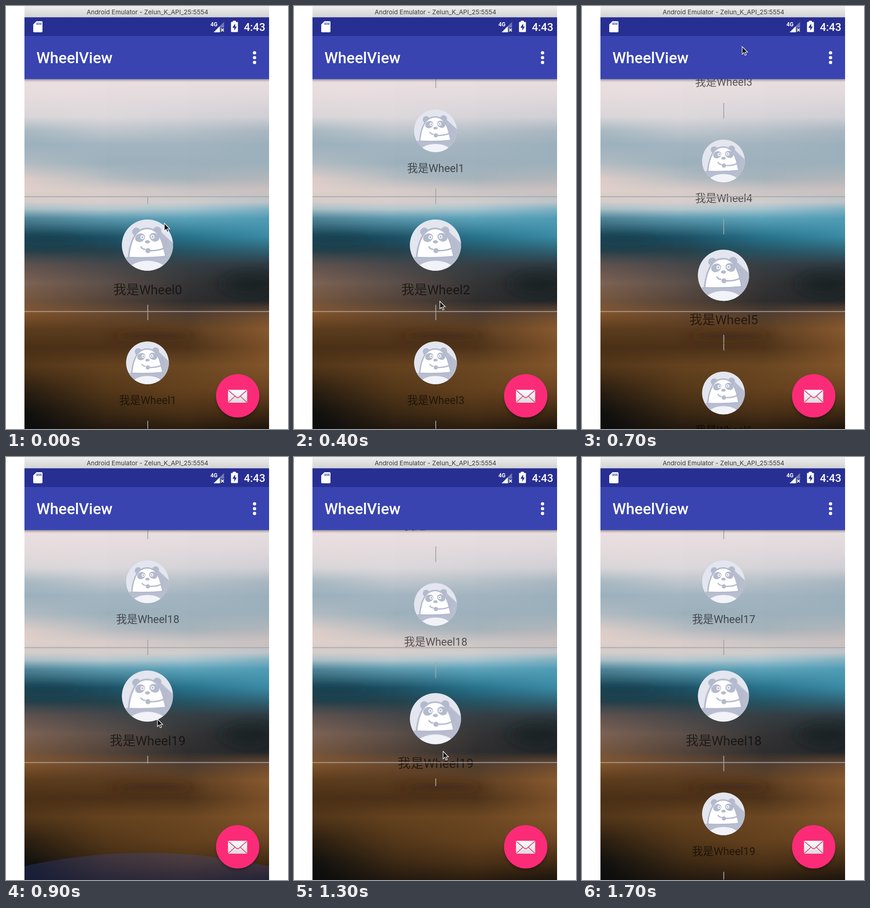
An HTML page that plays this animation: 611 by 917 pixels, repeating every 1.8 s.

```html
<!DOCTYPE html>
<html lang="en">
<head>
<meta charset="utf-8">
<title>WheelView</title>
<style>
  html, body { margin: 0; width: 100%; height: 100%; overflow: hidden; background: #fff; }
  svg { display: block; }
  text { font-family: Roboto, "Noto Sans CJK SC", "Noto Sans CJK", sans-serif; }
  .bar { font-family: Inter, sans-serif; font-size: 13.6px; fill: #3b3b3b; text-anchor: middle; }
  .label { text-anchor: middle; fill: #000; fill-opacity: .6; }
</style>
</head>
<body>
<svg width="611" height="917" viewBox="0 0 611 917">
  <defs>
    <linearGradient id="chrome" x2="0" y2="1">
      <stop stop-color="#efeeef"/><stop offset="1" stop-color="#d3d2d3"/>
    </linearGradient>
    <linearGradient id="drop" x2="0" y2="1">
      <stop stop-opacity=".32"/><stop offset="1" stop-opacity="0"/>
    </linearGradient>
    <linearGradient id="paper" x2="0" y2="1">
      <stop stop-color="#fff"/><stop offset="1" stop-color="#d9d9d9"/>
    </linearGradient>
    <filter id="soft" x="-50%" y="-80%" width="200%" height="260%"><feGaussianBlur stdDeviation="16 9"/></filter>
    <filter id="blur3" x="-20%" y="-20%" width="140%" height="140%"><feGaussianBlur stdDeviation="3"/></filter>
    <clipPath id="view"><rect x="40" y="158" width="530" height="759"/></clipPath>
    <clipPath id="disc"><circle r="55.5"/></clipPath>
    <g id="avatar" clip-path="url(#disc)">
      <circle r="56" fill="#e3e6ef"/>
      <path d="M28-30L62 2V60H-60L-44 26Z" fill="#b8bed0"/>
      <path d="M-60 27Q0 24 60 27V60H-60Z" fill="#b8bed0"/>
      <circle cx="-24" cy="-29" r="9" fill="#b4bacd"/>
      <circle cx="21" cy="-31" r="9" fill="#b4bacd"/>
      <path d="M-41 27C-39 6-32-35-2-36C26-37 34-6 40 25Q0 29-41 27Z" fill="#fff" stroke="#b4bacd" stroke-width="3.5"/>
      <ellipse cx="-16" cy="-16" rx="11" ry="9" transform="rotate(-25 -16 -16)" fill="#b4bacd"/>
      <ellipse cx="15" cy="-17" rx="11" ry="9" transform="rotate(25 15 -17)" fill="#b4bacd"/>
      <g fill="#b4bacd" stroke="#fff" stroke-width="2">
        <circle cx="-11" cy="-17" r="3.2"/><circle cx="11" cy="-18" r="3.2"/>
      </g>
      <ellipse cx="0" cy="-7" rx="5.5" ry="3.6" fill="#b4bacd"/>
      <path d="M-14 4Q-11 9-6 9M2 12Q27 13 38 5M33-14Q43-9 40 4Q38 9 34 8" fill="none" stroke="#b4bacd" stroke-width="3.2" stroke-linecap="round"/>
      <circle cx="1" cy="12" r="5.5" fill="#b4bacd"/>
      <ellipse cy="59" rx="43" ry="25" fill="#f1f3f9"/>
    </g>
  </defs>

  <g clip-path="url(#view)">
    <g id="photo"></g>
    <g filter="url(#soft)">
      <ellipse cx="95" cy="507" rx="70" ry="13" fill="#143d4c" opacity=".6"/>
      <ellipse cx="525" cy="603" rx="55" ry="28" fill="#1b1f23" opacity=".55"/>
      <ellipse cx="320" cy="715" rx="90" ry="9" fill="#38240f" opacity=".55"/>
      <ellipse cx="320" cy="360" rx="90" ry="13" fill="#9fb2bd" opacity=".5"/>
    </g>
    <g id="list"></g>
    <circle id="glow" cx="305" cy="2083" r="1225" fill="#3f51b5"/>
    <path d="M40 413.4H570M40 662.4H570" stroke="#a5a3a6" stroke-width="1.8"/>
    <rect x="40" y="158" width="530" height="7" fill="url(#drop)"/>
  </g>

  <rect x="40" width="530" height="25" fill="url(#chrome)"/>
  <text class="bar" x="306.5" y="17.5">Android Emulator - Zelun_K_API_25:5554</text>
  <rect x="40" y="24.5" width="530" height="41" fill="#272f93"/>
  <rect x="40" y="65" width="530" height="93.5" fill="#3944b1"/>

  <g fill="#fff">
    <path d="M66 33H77Q79 33 79 35V55Q79 57 77 57H61Q59 57 59 55V40Z"/>
    <path d="M67.5 36V41M71.5 36V41M75.5 36V41" stroke="#272f93" stroke-width="1.8"/>
    <text x="443" y="43.5" font-size="12" font-weight="700">4G</text>
    <path d="M450 57L472.5 34.5V57Z" opacity=".35"/>
    <path d="M450 57L463 44V57Z"/>
    <path d="M465 47H474V57H465Z" fill="#272f93"/>
    <path d="M466 49L472 55M472 49L466 55" stroke="#fff" stroke-width="2"/>
    <path d="M491.5 32H498V34.5H501Q502.500 34.500 502.500 36V55Q502.500 56.500 501 56.500H489Q487.500 56.500 487.500 55V36Q487.500 34.500 489 34.500H491.500Z"/>
    <path d="M496.500 38L490.500 47H494.500V53.500L500 44.500H496.500Z" fill="#272f93"/>
    <text x="515.500" y="54" font-size="23.500" font-weight="500">4:43</text>
    <text x="66" y="124" font-size="33.300" font-weight="500">WheelView</text>
    <circle cx="538.500" cy="101.500" r="3.600"/><circle cx="538.500" cy="112" r="3.600"/><circle cx="538.500" cy="122.300" r="3.600"/>
  </g>

  <circle cx="502" cy="849" r="46" opacity=".35" filter="url(#blur3)"/>
  <circle cx="502" cy="845" r="47" fill="#fb2b78"/>
  <rect x="481" y="832" width="41.500" height="28" rx="2" fill="url(#paper)"/>
  <path d="M482 833.500L499 848Q502 850.500 505 848L521.500 833.500M482 859L496 846M521.500 859L508 846" fill="none" stroke="#e0447c" stroke-width="1.700"/>

  <path id="cursor" d="M0 0V16.500L3.800 13L6.300 19L9 17.800L6.500 12H11.700Z" fill="#111" stroke="#fff" stroke-width="1.200"/>
</svg>
<script>
const NS = "http://www.w3.org/2000/svg";
const $ = id => document.getElementById(id);
function add(parent, tag, attrs) {
  const el = document.createElementNS(NS, tag);
  for (const k in attrs) el.setAttribute(k, attrs[k]);
  return parent.appendChild(el);
}

// Soft backdrop: vertical gradients at four columns, cross-faded horizontally
const stopY = [158, 200, 240, 270, 300, 340, 375, 400, 425, 440, 460, 500,
  530, 560, 600, 640, 665, 700, 740, 780, 830, 880, 917];
const columns = [
  "ecdfe1 e6dbdd d9d6d8 a9b9c2 9bb1bd b0bbc2 dccdc8 dfcfca d3cdcb a9bfc7 4f8396 1a4656 27414a 5f524e 7d6253 75563f 84552c 5c3d1e 4a3016 523619 2c1f11 0f100e 0a0c0d",
  "ebdfe1 e4dbde dcd8db c0c6cd a3b5c0 9db1bc b9bec2 d8ccc9 d5cecc b6c7cd 5c9aaf 1c5064 23414b 47474a 5d504a 54443a 6a4a30 5b3c1f 4c3118 64421f 553819 3b2814 231910",
  "eadfe1 e1dadd d5d3d7 b6c0c8 a3b4bf 9eb1bc a8b4bb cac4c4 cfcdcd a5c3ce 5ba2b9 27738c 265565 353f44 353536 2f2e2f 4f3d31 5f4023 4e331a 6b4722 65421e 4b3117 2b1d0f",
  "e9dee0 dfd7da cfcfd4 a9b6c0 9bb0bc 9cb0bc b2b6ba cbc0bf b9c3c8 7fb0c2 519cb5 3a8aa5 2f6274 2f3b42 202428 24282b 6b4a30 87592e 7b5029 83552a 6b4521 3f2913 1c140d"
];
const span = 530 / (columns.length - 1);

function gradient(id, box, stops) {
  const g = add($("photo"), "linearGradient", { id, gradientUnits: "userSpaceOnUse", ...box });
  stops.forEach(s => add(g, "stop", s));
}
columns.forEach((colors, i) => {
  const area = { x: 40, y: 158, width: 530, height: 759 };
  gradient("col" + i, { x1: 0, x2: 0, y1: 158, y2: 917 }, colors.split(" ").map((c, k) =>
    ({ offset: (stopY[k] - 158) / 759, "stop-color": "#" + c })));
  const layer = { ...area, fill: `url(#col${i})` };
  if (i) {
    gradient("fade" + i, { x1: 40 + (i - 1) * span, x2: 40 + i * span, y1: 0, y2: 0 }, [
      { offset: 0, "stop-color": "#fff", "stop-opacity": 0 },
      { offset: 1, "stop-color": "#fff" }
    ]);
    const mask = add($("photo"), "mask", { id: "mask" + i, maskUnits: "userSpaceOnUse", ...area });
    add(mask, "rect", { ...area, fill: `url(#fade${i})` });
    layer.mask = `url(#mask${i})`;
  }
  add($("photo"), "rect", layer);
});

// Wheel items
const ITEM = 251.5, HOME = 413, COUNT = 20;
const items = Array.from({ length: COUNT }, (_, i) => {
  const g = add($("list"), "g", {});
  add(g, "path", { d: `M307.2 0.5V16.6M307.2 ${ITEM - 16.8}V${ITEM}`, stroke: "#a5a3a6", "stroke-width": 1.8 });
  const face = add(g, "use", { href: "#avatar" });
  const label = add(g, "text", { class: "label", x: 307 });
  label.textContent = "我是Wheel" + i;
  return { g, face, label };
});

// time, scroll in items, cursor x, cursor y
const keys = [
  [0, 0, 343, 471], [100, .24, 326, 462], [200, .525, 317, 391],
  [300, 1.35, 317, 300], [400, 2, 316, 640], [500, 2.527, 315, 527],
  [600, 3.35, 330, 320], [700, 4.74, 347, 88], [800, 12.5, 338, 320],
  [900, 19, 328, 568], [1100, 19, 325, 588], [1200, 18.94, 324, 604],
  [1300, 18.805, 323, 638], [1400, 18.55, 322, 704], [1500, 18.2, 322, 800],
  [1600, 18.03, 324, 930], [1700, 18, 324, 930]
];
function sample(t) {
  let i = 0;
  while (i < keys.length - 2 && t >= keys[i + 1][0]) i++;
  const a = keys[i], b = keys[i + 1];
  const u = Math.min(1, (t - a[0]) / (b[0] - a[0]));
  return a.map((v, k) => v + (b[k] - v) * u);
}

const LOOP = 1800, STEP = 100;
function draw(now) {
  const t = Math.floor((now % LOOP) / STEP) * STEP;
  const [, scroll, x, y] = sample(t);
  const picked = Math.round(scroll - .001);
  items.forEach(({ g, face, label }, i) => {
    const top = HOME + (i - scroll) * ITEM;
    const seen = top > 158 - ITEM && top < 917;
    g.setAttribute("display", seen ? "inline" : "none");
    if (!seen) return;
    const big = i === picked;
    g.setAttribute("transform", `translate(0 ${top.toFixed(2)})`);
    face.setAttribute("transform", big ? "translate(306.5 105.3)" : "translate(306.5 109) scale(.835)");
    label.setAttribute("font-size", big ? 28.1 : 23.4);
    label.setAttribute("y", big ? 212 : 198);
  });
  $("glow").setAttribute("opacity", t < 900 ? 0 : Math.max(0, .25 * (1 - (t - 900) / 200)));
  $("cursor").setAttribute("transform", `translate(${x} ${y})`);
}

const start = performance.now();
function tick() {
  draw(performance.now() - start);
  requestAnimationFrame(tick);
}
tick();
</script>
</body>
</html>
```
